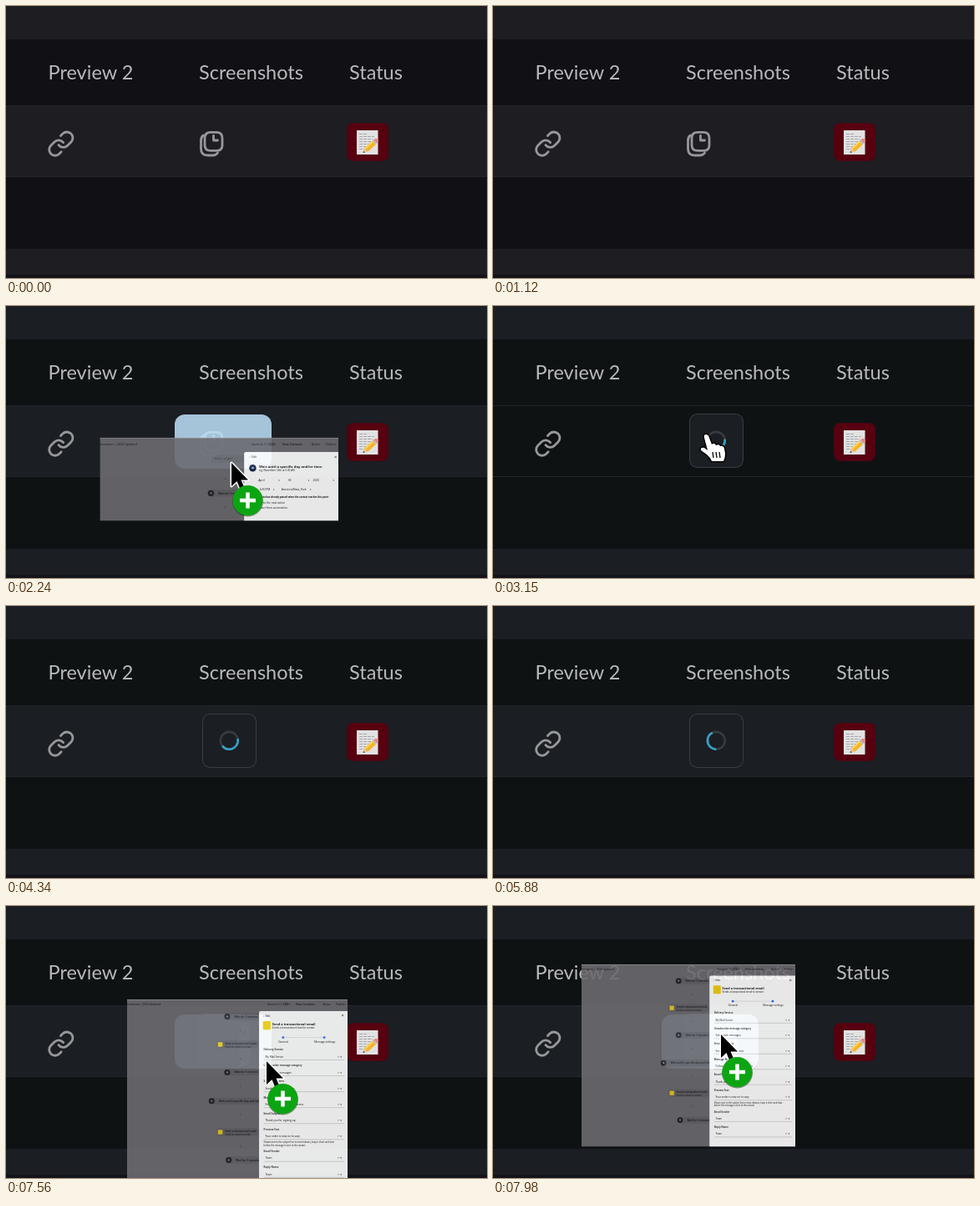
Write an HTML page with a canvas that moves like this. It is 576 px wide and 326 px high and loops after 8 s.

```html
<!DOCTYPE html>
<html lang="en">
<head>
<meta charset="utf-8">
<title>Screenshot upload</title>
<style>
  html, body { margin: 0; width: 100%; height: 100%; overflow: hidden; background: #0e1213; }
  svg, canvas { position: absolute; left: 0; top: 0; width: 576px; height: 326px; }
  svg { --light: #1b1e23; --dark: #0e1213; --row: var(--light); --line: #22262a; }
  svg.warm { --light: #1e1d22; --dark: #111015; --line: #27262b; }
  svg.hover { --row: var(--dark); }
  text { font: 23.5px Lato, sans-serif; fill: #b8b9bb; }
  .icon { fill: none; stroke: #97989b; stroke-linecap: round; stroke-linejoin: round; }
</style>
</head>
<body>
<svg id="scene" viewBox="0 0 576 326">
  <rect width="576" height="326" fill="var(--dark)"/>
  <rect width="576" height="40" fill="var(--light)"/>
  <rect y="119" width="576" height="86" fill="var(--row)"/>
  <path d="M0 119.5H576M0 204.5H576" stroke="var(--line)"/>
  <rect y="291" width="576" height="31" fill="var(--light)"/>
  <rect y="322" width="576" height="4" fill="#15131a"/>
  <text x="50.5" y="88">Preview 2</text>
  <text x="231" y="88">Screenshots</text>
  <text x="411" y="88">Status</text>
  <g class="icon" transform="translate(48.8 148.1) scale(1.42)" stroke-width="2">
    <path d="M10 13a5 5 0 0 0 7.54.54l3-3a5 5 0 0 0-7.07-7.07l-1.72 1.71"/>
    <path d="M14 11a5 5 0 0 0-7.54-.54l-3 3a5 5 0 0 0 7.07 7.07l1.71-1.71"/>
  </g>
  <g id="copy" class="icon" stroke-width="2.8">
    <path d="M245 151.4h7q7 0 7 7v8q0 7-7 7h-7q-7 0-7-7v-8q0-7 7-7z"/>
    <path d="M248.5 155.5v5.5h5M236.500 155q-3 2-3 6v10q0 8 8 8h6q4 0 6-3"/>
  </g>
  <rect x="408.5" y="140.5" width="49" height="45" rx="7" fill="#57000f" stroke="#480712"/>
  <rect x="420" y="149" width="25.500" height="29" fill="#e2e2e3"/>
  <path d="M423 153.500h9M423 156.500h18M423 159.500h16M423 162.500h18M423 165.500h12M423 168.500h8M423 171.500h6" stroke="#a4a7ab" stroke-dasharray="4 1"/>
  <g transform="translate(427.500 176) rotate(-43)">
    <path d="M0 0l5-3v6z" fill="#e9c596"/>
    <path d="M0 0l2-1.200v2.400z" fill="#333"/>
    <path d="M5-3h13v6h-13z" fill="#f3b52c"/>
    <path d="M5-3h13v2h-13z" fill="#ffd75e"/>
    <path d="M18-3h2v6h-2z" fill="#b9bcc0"/>
    <path d="M20-3q4 0 4 3t-4 3z" fill="#e58a86"/>
  </g>
</svg>
<canvas id="stage" width="576" height="326"></canvas>
<script>
const LOOP = 8000, STEP = 70, W = 576, H = 326;
const scene = document.getElementById('scene');
const copy = document.getElementById('copy');
const stage = document.getElementById('stage').getContext('2d');
const sheet = Object.assign(document.createElement('canvas'), { width: W, height: H }).getContext('2d');
let c = stage; // context the helpers draw on

// Rows are [time, value, value, ...]; values run straight between rows.
function track(t, rows) {
  if (t <= rows[0][0]) return rows[0].slice(1);
  for (let i = 1; i < rows.length; i++) {
    const a = rows[i - 1], b = rows[i];
    if (t < b[0]) {
      const k = (t - a[0]) / (b[0] - a[0]);
      return a.slice(1).map((v, j) => v + (b[j + 1] - v) * k);
    }
  }
  return rows[rows.length - 1].slice(1);
}

function box(x, y, w, h, fill, r = 0) {
  c.beginPath();
  c.roundRect(x, y, w, h, r);
  c.fillStyle = fill;
  c.fill();
}

function dot(x, y, r, fill) {
  c.beginPath();
  c.arc(x, y, r, 0, 7);
  c.fillStyle = fill;
  c.fill();
}

function ring(x, y, r, color, width, from = 0, to = 7) {
  c.beginPath();
  c.arc(x, y, r, from, to);
  c.strokeStyle = color;
  c.lineWidth = width;
  c.stroke();
}

function line(x1, y1, x2, y2, color, width = 0.6) {
  c.beginPath();
  c.moveTo(x1, y1);
  c.lineTo(x2, y2);
  c.strokeStyle = color;
  c.lineWidth = width;
  c.stroke();
}

function label(s, x, y, size, weight = 400, fill = '#1b1b1e') {
  c.font = `${weight} ${size}px "Open Sans", sans-serif`;
  c.fillStyle = fill;
  c.fillText(s, x, y);
}

function header(w, h, base, size) {
  box(0, 0, w, h, '#6c6b71');
  line(0, 0.5, w, 0.5, '#98989d', 1);
  label('Automation | 2024 Updated', -4, base, size);
  label('Saved at 11:41:23', w * 0.635, base, size);
  ring(w * 0.722, base - size * 0.35, size * 0.45, '#222', 0.6);
  label('View Contacts', w * 0.765, base, size, 600);
  label('Active', w * 0.888, base, size);
  label('Publish', w * 0.947, base, size);
}

function step(x, y, r, w, text, size) {
  box(x - r, y - r, w, r * 2, '#636268', r);
  dot(x, y, r * 0.85, '#25262c');
  dot(x, y, r * 0.25, '#8d8f96');
  label(text, x + r * 2.1, y + size * 0.35, size, 600);
}

// Wide capture, 402 x 140 units
function waitPage() {
  header(402, 140, 12.5, 5);
  box(188, 29, 55, 13, '#67666c', 5);
  label('Add a trigger', 194, 37, 5, 400, '#36363b');
  step(187, 93.5, 6, 61, 'Wait for 3 minutes', 4.6);
  label('↓', 209, 71, 6);
  label('↓', 209, 119, 6);

  box(243, 24, 159, 116, '#fff', [3, 0, 0, 0]);
  label('‹  Edit', 252, 34.5, 4.5);
  label('×', 395, 35, 8);
  dot(257.5, 51, 6, '#17284a');
  dot(257.5, 51, 2, '#9aa9c4');
  label('Wait until a specific day and/or time', 268, 50.5, 5.9, 700);
  label('e.g. November 14th at 6:30 AM', 268, 56.5, 4.2);
  [['April', 267], ['30', 317], ['2025', 359]].forEach(([s, x]) => {
    label(s, x, 73, 4.8);
    label('▾', x + 34, 73, 4);
  });
  label('at   4:30 PM', 261, 88.5, 4.8);
  label('▾', 292, 88.5, 4);
  label('America/New_York', 306, 88.5, 4.8);
  label('▾', 354, 88.5, 4);
  label('If selected data has already passed when the contact reaches this point', 250, 102, 3.8, 700);
  label('⊢ Continue to the next action', 250, 111, 4.5);
  label('⊢ Exit contact from automation', 250, 119.5, 4.5);
}

// Tall capture, 284 x 242 units
function mailPage() {
  header(284, 242, 7.3, 3.6);
  const nodes = [[129, 22], [120, 58, true], [129, 94], [109, 131], [120, 171, true], [131, 207]];
  nodes.forEach(([x, y, mail], i) => {
    if (mail) {
      box(x - 5, y - 5, 175 - x, 10, '#636268', 5);
      box(x - 3, y - 3, 6, 6, '#e3c620', 1);
      label('Send a transactional email', x + 6, y, 3.2, 600);
      label('Sends an email to contact', x + 6, y + 4, 2.8);
    } else {
      step(x, y, 4.4, 175 - x, i == 3 ? 'Wait until a specific day and time' : 'Wait for 3 minutes', 3.4);
    }
    if (i < 5) label('↓', 145, y + 19, 4.5);
  });

  box(170, 15, 114, 227, '#fff', [2, 0, 0, 0]);
  label('‹  Edit', 175, 22.5, 3.6);
  label('×', 276, 23, 6);
  box(175, 28, 10, 11, '#f2cf12', 1);
  label('Send a transactional email', 187, 33.5, 4.2, 700);
  label('Sends a transactional email to contact', 187, 38, 3.1);
  line(201, 49, 254, 49, '#c9cdd8', 0.5);
  dot(201, 49, 1.5, '#2f6df0');
  dot(254, 49, 1.5, '#2f6df0');
  label('General', 195, 55.5, 3.4);
  label('Message settings', 241, 55.5, 3.4);
  const fields = [
    ['Delivery Service', 'My Mail Server'], ['Unsubscribe message category', 'Sales team messages'],
    ['Sender Domains', 'Sends from main server'], ['Message Name', 'Follow-up for Customer Service'],
    ['Email Subject', 'Thank you for signing up'], ['Preview Text', 'Your order is now on its way'],
    ['Email Sender', 'Team'], ['Reply Name', 'Team']
  ];
  fields.forEach(([name, value], i) => {
    const y = 66 + i * 20.5 + (i > 5 ? 8 : 0);
    label(name, 176, y, 3.3, 600);
    label(value, 178, y + 9, 3.4);
    label('×  ▾', 271, y + 9, 3.4);
    line(176, y + 12, 280, y + 12, '#999', 0.4);
  });
  label('Shown next to the subject line in most inboxes, keep it short and clear', 176, 185, 2.8);
  label('before the message is sent to the contact', 176, 189, 2.8);
}

function paint(page, x, y, scale) {
  c.save();
  c.translate(x, y);
  c.scale(scale, scale);
  page();
  c.restore();
}

// The capture is painted on its own sheet so it turns translucent as a whole.
function dragged(page, pageWidth, [x, y, w, cx, cy]) {
  if (cy < 205) box(202, 130, 116, 65, 'rgba(190,226,250,.85)', 12);
  sheet.clearRect(0, 0, W, H);
  c = sheet;
  paint(page, x, y, w / pageWidth);
  c = stage;
  c.globalAlpha = 0.9;
  c.drawImage(sheet.canvas, 0, 0);
  c.globalAlpha = 1;
  pointer(cx, cy);
}

const ARROW = new Path2D('M0 0V28L6.5 22L11 33L16 31L11.5 20.5H20Z');
const HAND = new Path2D('M-2 3q-1-4 2-4q3 0 4 4l3 8q3-3 5 1q4-2 5 1q4-1 5 3l1 6q0 5-2 9h-14' +
  'q-2-5-6-8l-7-5q-1-4 4-3l4 3z');

function shape(path, x, y, fill, edge) {
  c.save();
  c.translate(x, y);
  c.lineJoin = 'round';
  c.lineWidth = 3;
  c.strokeStyle = edge;
  c.stroke(path);
  c.fillStyle = fill;
  c.fill(path);
  c.restore();
}

function pointer(x, y) {
  shape(ARROW, x, y, '#000', '#fff');
  const px = x + 19.5, py = y + 45;
  dot(px, py + 1, 18.5, 'rgba(0,60,0,.5)');
  dot(px, py, 18, '#0ca512');
  line(px - 9.5, py, px + 9.5, py, '#fff', 4.5);
  line(px, py - 9.5, px, py + 9.5, '#fff', 4.5);
}

function hand(x, y) {
  shape(HAND, x, y, '#fff', '#000');
  [11, 15, 19].forEach(d => line(x + d - 3, y + 20, x + d - 2, y + 27, '#000', 1.3));
}

function spinner(t) {
  box(235, 129, 65, 65, '#3a3d41', 9.5);
  box(236, 130, 63, 63, '#1b1e23', 8.5);
  const mid = (65 + (t - 4340) * 0.3) * Math.PI / 180;
  ring(267.3, 161.3, 10.4, '#373b40', 2.6);
  ring(267.3, 161.3, 10.4, '#35a2c6', 2.6, mid - 1.35, mid + 1.35);
}

function thumbnail(alpha) {
  c.save();
  c.globalAlpha = alpha;
  c.beginPath();
  c.roundRect(228, 129, 64, 64, 10);
  c.clip();
  paint(waitPage, 168.3, 129, 0.457);
  c.restore();
}

const FIRST = [[1820, 110, 296, 440, 345, 318], [1960, 94, 188, 402, 322, 217],
  [2170, 112, 162, 300, 274, 190], [2380, 114, 150, 256, 262, 184]];
const SECOND = [[7350, 200, 184, 284, 363, 241], [7560, 145, 112, 264, 312, 186],
  [7770, 114, 78, 256, 282, 161], [7980, 106, 70, 256, 273, 154]];
const HOVER = [[2800, 261, 172], [3010, 255, 155], [3430, 255, 155], [3710, 262, 198]];

function draw() {
  const t = Math.floor(performance.now() % LOOP / STEP) * STEP;
  scene.classList.toggle('warm', t < 1820);
  scene.classList.toggle('hover', t >= 2800 && t < 3640);
  copy.style.display = t < 2800 ? '' : 'none';
  c.clearRect(0, 0, W, H);
  if (t >= 2800 && t < 6580) spinner(t);
  if (t >= 6580) thumbnail(Math.min(1, (t - 6510) / 210));
  if (t >= 2800 && t < 3710) hand(...track(t, HOVER));
  if (t >= 1820 && t < 2800) dragged(waitPage, 402, track(t, FIRST));
  if (t >= 7350) dragged(mailPage, 284, track(t, SECOND));
  requestAnimationFrame(draw);
}
draw();
</script>
</body>
</html>
```
